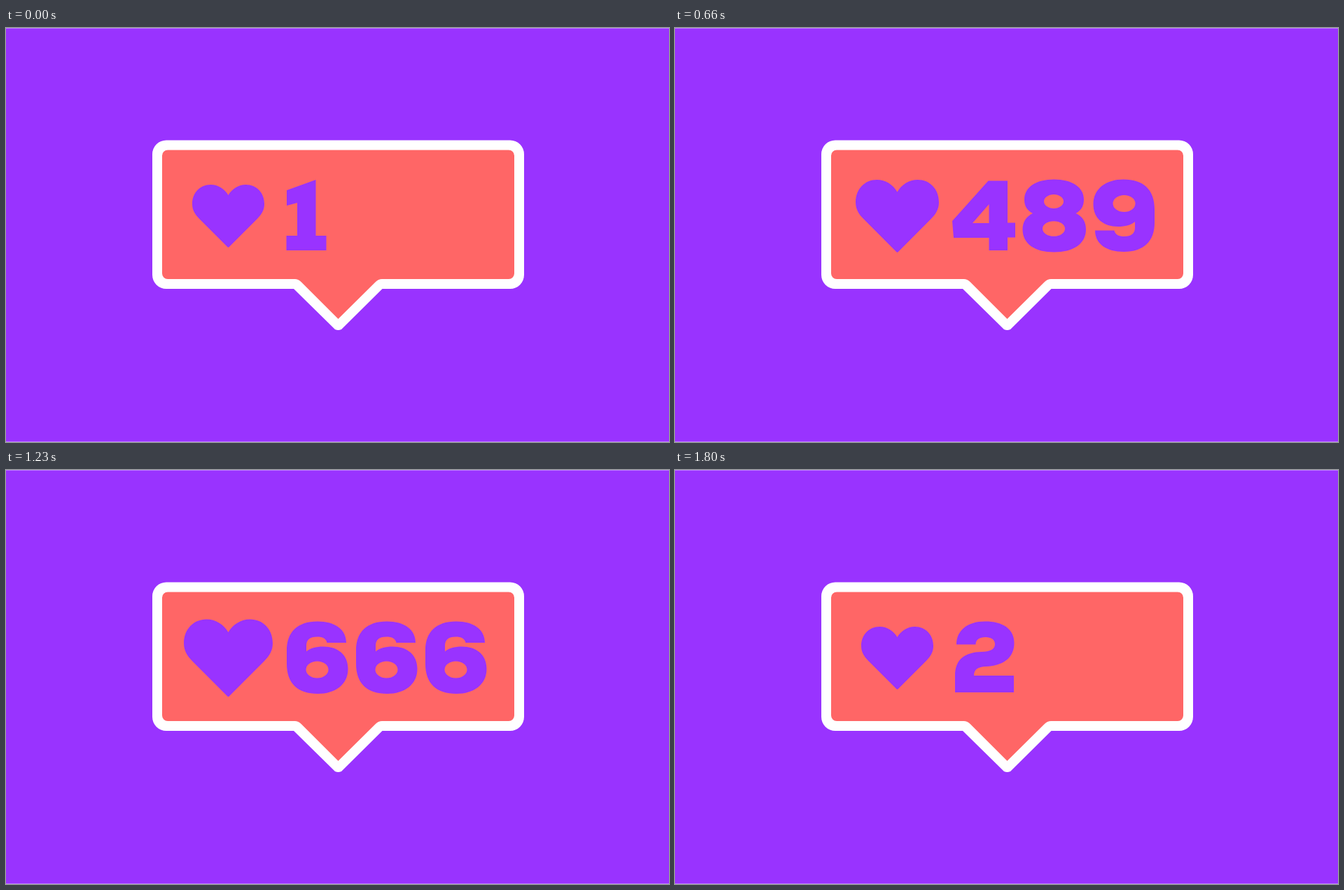
Animation of 947x592 px, one loop 1.83 s. Source, as an HTML page with a canvas:

```html
<!DOCTYPE html>
<html lang="en">
<head>
<meta charset="utf-8">
<title>Like counter</title>
<style>
  html, body { margin: 0; width: 100%; height: 100%; overflow: hidden; background: #93f; }
  canvas { display: block; }
</style>
</head>
<body>
<canvas id="stage" width="947" height="592" role="img" aria-label="Speech bubble with a beating heart and a like counter"></canvas>
<script>
const ctx = document.getElementById('stage').getContext('2d');
const PURPLE = '#9933ff', CORAL = '#ff6666', WHITE = '#ffffff';
const STEP = 30, STEPS = 61;

const oval = (cx, cy, rx, ry) =>
  `M${cx - rx} ${cy}a${rx} ${ry} 0 1 0 ${2 * rx} 0a${rx} ${ry} 0 1 0 ${-2 * rx} 0Z`;

// Wide, heavy numerals, all drawn in the first digit's place
const outlines = {
  0: `M445.75 216.5C474.5 216.5 491 233 491 261V276C491 304 474.5 320.5 445.75 320.5
      C417 320.5 400.5 304 400.5 276V261C400.5 233 417 216.5 445.75 216.5Z
      M445.75 240.5C434.5 240.5 428.5 247 428.5 258V279.5C428.5 290.5 434.5 297 445.75 297
      C457 297 463.5 290.5 463.5 279.5V258C463.5 247 457 240.5 445.75 240.5Z`,
  1: 'M442.5 217V297H457.5V318H400.5V297H416V250L401 254V232Z',
  2: `M402 249.5C402 230 417 216.5 443 216.5C468 216.5 484.5 227 484.5 247.5
      C484.5 270 467 280 444 281C433 281.5 427 285 427 294H484V318H400V294
      C400 270 415 260.5 438 260C450 259.7 457 256.5 457 249C457 242.5 451.5 239 443.5 239
      C435 239 429.5 242.5 429.5 249.5Z`,
  3: `M401 247C401 228 417 216.5 443 216.5C469 216.5 485 227 485 244C485 254 480.5 261 472 264.5
      C482 268.5 487.5 276.5 487.5 288C487.5 309 470 320.5 443 320.5C416 320.5 399 308 399 287H426.5
      C427 294 433 298 443 298C453 298 459.5 294.5 459.5 287C459.5 280 454 276.5 445 276.5H431V256H445
      C453 256 457.5 253 457.5 247.5C457.5 242 452 239 443 239C434.5 239 429 242 428.5 247Z`,
  4: `M447.5 218.5H475V278.5H486V299.5H475V318H448.5V300H398L396 276Z
      M448.5 252L425 279H448.5Z`,
  5: `M405 218.5H482V241H430L429 253C434 250.5 441 249 449 249C472 249 487 261 487 282.5
      C487 306 470 320.5 443 320.5C417 320.5 400 309 399.5 289H427C428 295 434 298 443 298
      C453 298 459 293 459 284.5C459 276.5 453 271.5 444 271.5C437 271.5 431.5 273.5 428.5 277.5H403Z`,
  6: `M486 247H458.5C457.5 241 452 238.5 444.5 238.5C434 238.5 429 243 429 251V259.5
      C434 255 443 252.5 453 252.5C474 252.5 488.5 264 488.5 284.5C488.5 307 470 320 445.5 320
      C417 320 401 305.5 401 277V258C401 232 416 216.5 445 216.5C470 216.5 486 228 486 247Z`
      + oval(444.5, 285.5, 16, 12),
  7: 'M399 218.5H481V241C461 260 451 285 450 318H420C421 288 432 261 451 242H399Z',
  8: `M445 216.5C470.5 216.5 487.5 227.5 487.5 245C487.5 255 483.5 261 476 265
      C485.5 269.5 490.5 277 490.5 288C490.5 309 472 320.5 445 320.5C418 320.5 400 309 400 288
      C400 277 405.5 269.5 414.5 265C406.5 261 402.5 255 402.5 245.5C402.5 227.5 419 216.5 445 216.5Z`
      + oval(444.5, 248, 14, 10) + oval(444.5, 287, 16, 10.8)
};
const glyphs = {};
for (const d in outlines) glyphs[d] = new Path2D(outlines[d]);
glyphs[9] = new Path2D();
glyphs[9].addPath(glyphs[6], new DOMMatrix([-1, 0, 0, -1, 889, 536.5]));
const advance = [102, 65, 96.5, 98, 96.5, 98, 99, 88, 100.5, 99];

// Heart 100 units wide, top at 0
const heart = new Path2D(`M0 14.6C-5 6 -14 0 -24.5 0C-39 0 -50 11 -50 27
  C-50 35 -46.5 41 -40.5 47L-1 86.7Q0 87.6 1 86.7L40.5 47
  C46.5 41 50 35 50 27C50 11 39 0 24.5 0C14 0 5 6 0 14.6Z`);

const rim = new Path2D(`M229 160.5H720A20 20 0 0 1 740 180.5V353A20 20 0 0 1 720 373H537.5
  L479 431Q474.5 433 470 431L411 373H229A20 20 0 0 1 209 353V180.5A20 20 0 0 1 229 160.5Z`);
const panel = new Path2D(`M231 174.5H718A8 8 0 0 1 726 182.5V351A8 8 0 0 1 718 359H537
  Q532 359 528 363L474.5 416L421.5 363Q417.5 359 412.5 359H231A8 8 0 0 1 223 351V182.5A8 8 0 0 1 231 174.5Z`);

const fill = (path, color) => {
  ctx.fillStyle = color;
  ctx.fill(path, 'evenodd');
};

// Two beats per loop, each eased up and down over 15 steps
function heartWidth(i) {
  const p = i % 30;
  const u = p < 15 ? p / 15 : 2 - p / 15;
  return 103 + 29 * u * u * (3 - 2 * u);
}

function count(i) {
  if (i < 30) return Math.round(1 + 665 * i / 30);
  if (i < 45) return 666;
  return Math.round(666 - 664 * (i - 45) / 15);
}

function drawHeart(width) {
  ctx.save();
  ctx.translate(317.5, 269);
  ctx.scale(width / 100, width / 100);
  ctx.translate(0, -43.7);
  fill(heart, PURPLE);
  ctx.restore();
}

function drawNumber(n) {
  ctx.save();
  for (const d of String(n)) {
    fill(glyphs[d], PURPLE);
    ctx.translate(advance[d], 0);
  }
  ctx.restore();
}

function draw(i) {
  ctx.fillStyle = PURPLE;
  ctx.fillRect(0, 0, 947, 592);
  ctx.fillStyle = 'rgba(255,255,255,.35)';
  ctx.fillRect(0, 0, 947, 1);
  ctx.fillRect(0, 591, 947, 1);
  fill(rim, WHITE);
  fill(panel, CORAL);
  drawHeart(heartWidth(i));
  drawNumber(count(i));
}

const start = performance.now();
function tick() {
  const t = performance.now() - start;
  draw(Math.floor(t / STEP) % STEPS);
  requestAnimationFrame(tick);
}
tick();
</script>
</body>
</html>
```
